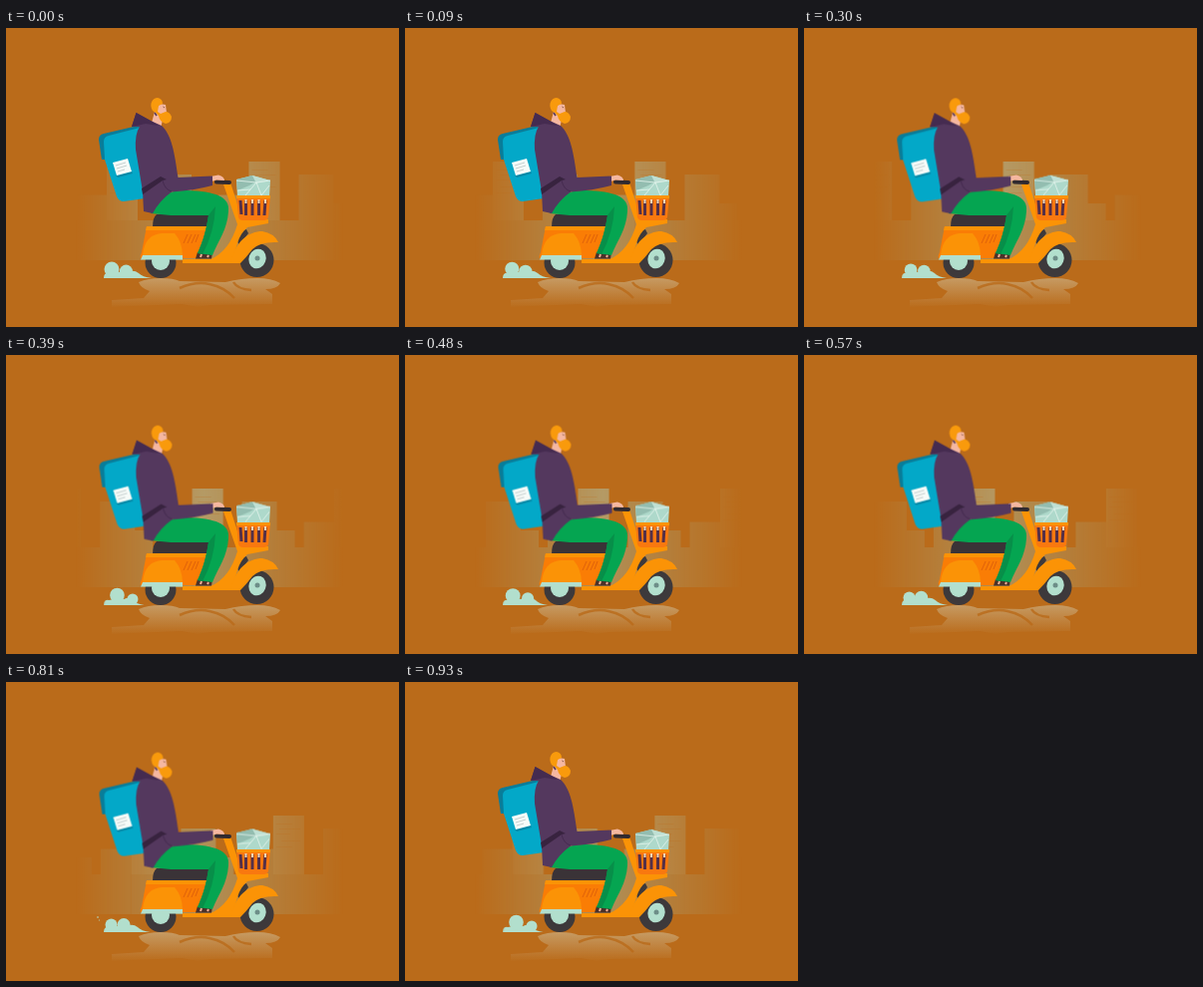
Write an HTML page that moves like this. It is 394 by 300 pixels and loops after 0.96 s.

```html
<!DOCTYPE html>
<html lang="en">
<head>
<meta charset="utf-8">
<title>Scooter courier</title>
<style>
html, body { margin: 0; width: 100%; height: 100%; overflow: hidden; background: #ba6b1a; }
svg { display: block; width: 100vw; height: 100vh; }
.city, .smoke *, .bob, .parcel { animation: .96s linear infinite; }
.city { animation-name: city; animation-timing-function: steps(32); }
.bob { animation-name: bob; }
.parcel { animation-name: parcel; }
.smoke { fill: #b2dfcd; }
.smoke .a { animation-name: puffA; }
.smoke .b { animation-name: puffB; }
.smoke .base { animation-name: base; transform-origin: 99px 251px; }
.smoke .dots { animation-name: dots; animation-timing-function: step-end; }

@keyframes city { to { transform: translateX(-140px); } }
@keyframes bob {
  0%, 18.8%, 71.9%, 96.9%, 100% { transform: none; }
  40.6%, 59.4%, 84.4% { transform: translate(.5px, .6px); }
}
@keyframes parcel {
  0%, 18.8%, 71.9%, 100% { transform: none; }
  40.6%, 59.4%, 84.4% { transform: translateY(-.6px); }
}
@keyframes puffA {
  0%, 56.3% { cx: 106px; cy: 242px; r: 7.5px; }
  3.1%, 59.4% { cx: 105.5px; cy: 243.5px; r: 6px; }
  15.6%, 18.8%, 71.9% { cx: 109px; cy: 240px; r: 8px; }
  28.1%, 84.4% { cx: 105.5px; cy: 243.5px; r: 6px; }
  40.6%, 96.9%, 100% { cx: 111.5px; cy: 241px; r: 7.3px; }
}
@keyframes puffB {
  0%, 56.3% { cx: 120.5px; cy: 244px; r: 6.5px; }
  3.1%, 59.4% { cx: 117.5px; cy: 243.5px; r: 6.7px; }
  15.6%, 18.8%, 71.9% { cx: 124px; cy: 245px; r: 6.5px; }
  28.1%, 84.4% { cx: 118px; cy: 243.5px; r: 6.5px; }
  40.6%, 96.9%, 100% { cx: 127px; cy: 245px; r: 5.5px; }
}
@keyframes base {
  0%, 56.3% { transform: none; }
  3.1%, 59.4% { transform: scaleX(.96); }
  15.6%, 18.8%, 71.9% { transform: scaleX(1.04); }
  28.1%, 84.4% { transform: scaleX(.97); }
  40.6%, 96.9%, 100% { transform: scaleX(.84); }
}
@keyframes dots {
  0%, 31.3%, 87.5%, 100% { opacity: 0; transform: none; }
  12.5%, 68.8% { opacity: 1; transform: none; }
  25%, 81.3% { opacity: .6; transform: translate(-4px, -6px); }
}
</style>
</head>
<body>
<svg viewBox="0 0 394 300" preserveAspectRatio="none">
  <defs>
    <linearGradient id="fade" gradientUnits="userSpaceOnUse" x1="70" x2="338">
      <stop offset="0" stop-color="#fff" stop-opacity="0"/>
      <stop offset=".48" stop-color="#fff"/>
      <stop offset="1" stop-color="#fff" stop-opacity="0"/>
    </linearGradient>
    <mask id="edges" maskUnits="userSpaceOnUse" x="0" y="0" width="394" height="300">
      <rect x="70" y="120" width="268" height="120" fill="url(#fade)"/>
    </mask>
    <linearGradient id="wet" gradientUnits="userSpaceOnUse" x1="0" x2="0" y1="251" y2="281">
      <stop offset="0" stop-color="#cdb48a" stop-opacity=".65"/>
      <stop offset="1" stop-color="#cdb48a" stop-opacity="0"/>
    </linearGradient>
    <g id="block">
      <path fill="#ad9c6c" fill-opacity=".75" d="M0 233V134H31V193H50V147H85V176H103V193H112V167.500H142.500V233Z"/>
      <path fill="#c0b486" fill-opacity=".3" d="M0 134H31V193H0Z"/>
      <path stroke="#ba6b1a" stroke-opacity=".22" d="M3 142.500H19M6 147.500H27M3 152.500H17M8 159.500H27M3 165.500H19"/>
    </g>
  </defs>

  <g mask="url(#edges)">
    <g class="city">
      <use href="#block" x="-41.5"/>
      <use href="#block" x="101"/>
      <use href="#block" x="243.5"/>
      <use href="#block" x="386"/>
    </g>
  </g>

  <!-- reflection -->
  <path fill="url(#wet)" d="M133 255Q142 251 155 251Q168 251 174 254L220 255Q236 251 252 251Q266 251 275 256Q272 262 260 262L267 267V277L205 278L192 280L176 277L106 280V273L138 271L144 264Q135 261 133 255Z"/>
  <path fill="none" stroke="#ba6b1a" stroke-width="2.5" stroke-opacity=".8" d="M174 261Q190 254 204 257Q219 260 229 271M228 255Q232 262 246 263"/>

  <g class="smoke">
    <path class="base" d="M98 251Q98 245 104 246Q112 244 122 245Q128 242 133 246Q137 250 146 251Z"/>
    <circle class="a" cx="106" cy="242" r="7.500"/>
    <circle class="b" cx="120" cy="244" r="6.500"/>
    <g class="dots"><circle cx="96" cy="242" r="1"/><circle cx="97.500" cy="245" r=".7"/></g>
  </g>

  <!-- wheels -->
  <g fill="#3d393b">
    <circle cx="155" cy="235.500" r="15.500"/>
    <circle cx="251.500" cy="233" r="17"/>
  </g>
  <g fill="#b2dfcd">
    <circle cx="155" cy="234" r="9"/>
    <ellipse cx="252" cy="231.500" rx="8.500" ry="10" transform="rotate(20 252 231.500)"/>
  </g>
  <circle cx="252" cy="231" r="2.500" fill="#6d8e88"/>

  <!-- scooter -->
  <path fill="#3a3337" d="M151 187H204L202 200H147Q147 190 151 187Z"/>
  <path fill="#fa7d05" d="M141 199H203L196 231H135Q134 229 136 225Z"/>
  <path fill="#fb9306" d="M141 199H203L202 203H140Z"/>
  <path fill="#fb9306" d="M137 229C138 212 147 206 158 206H169Q177 215 177 229Z"/>
  <path fill="#b2dfcd" d="M137 228H177V232.500H135Z"/>
  <path fill="none" stroke="#e0620a" d="M178 216L182 207M182 216L186 207M186 216L190 207M190 215L193 207"/>
  <path fill="#3d393b" d="M232 214L235 204L241 202L243 206L234 218Z"/>
  <path fill="#fb9306" d="M218 157L225 155L237 192H263V196L242 200Q235 206 232 216Q228 230 226 236H177V232H205Q224 224 232 197Z"/>
  <path fill="#fb9306" d="M225 236C230 214 243 204 257 204Q269 206 273 215Q255 214 247 222Q241 230 235 236Z"/>

  <!-- parcel and basket -->
  <g class="parcel">
    <path fill="#aed9cb" d="M231 152L247 148L265 153L264 169H232Z"/>
    <path fill="#93bdb0" d="M231 152L247 148L251 154L244 158L232 163Z"/>
    <path fill="#bfe0d4" d="M247 148L265 153L251 156Z"/>
    <path fill="none" stroke="#e6f5ee" stroke-width=".8" d="M231 153L251 155L265 153M251 155L240 168M251 155L256 168L264 158M232 163L245 162"/>
  </g>
  <path fill="#f9780f" d="M231 168H265L263 190Q262 193 258 193H238Q234 193 233 190Z"/>
  <path fill="#fb9306" d="M231 168H265V171H231Z"/>
  <path stroke="#553047" stroke-width="3" d="M235 173L236 187M240.500 173V188M247 173V188M253.500 173V188M260 173L259 188"/>
  <path stroke="#f6d9b5" stroke-width="2" d="M240.500 172V176M247 172V176M253.500 172V176M260 172V176"/>

  <!-- legs -->
  <path fill="#4b3129" d="M190 231.500L192 225H207L206 231.500Z"/>
  <path fill="#05a551" d="M145 186C152 168 162 163 182 163C209 164 225 169 223 184C222 202 213 213 207 228L192 226C198 213 201 202 203 188H165Z"/>
  <path fill="#078f49" d="M203 188L210 179Q209 205 197 227L192 226C198 213 201 201 203 188Z"/>
  <path stroke="#f3b298" stroke-width="2" d="M196 227L195 230M203 228L202 230"/>

  <!-- handlebar -->
  <path stroke="#302a30" stroke-width="4" stroke-linecap="round" d="M211 154.500L224 155"/>
  <path fill="#f5b7a0" d="M205 149L213 147.500Q219 149 219 153L211 152.500L206 154Z"/>

  <g class="bob">
    <!-- head -->
    <path fill="#f5b7a0" d="M149 84L146 95L155 101L157 92L161 85L160 77L154 76Z"/>
    <path fill="#f99a0c" d="M147 83C143 76 147 70 152 70Q157 71 157 76L153 78L152 84L155 86L160 84Q164 84 166 89Q166 95 160 96Q154 94 153 88L150 85Z"/>
    <path stroke="#54385e" stroke-width="1.500" d="M149 85L151 88"/>
    <path stroke="#6a3b2a" stroke-width=".8" d="M157.500 79L159 80"/>

    <!-- backpack -->
    <path fill="#087d9a" d="M93 112Q93 107 98 106L128 99L134 99L130 110L101 132L96 132Z"/>
    <path fill="#03a8c8" d="M98 114Q98 109 103 108L134 100L132 118L139 171L118 174Q113 174 111 169L99 132Z"/>
    <path fill="#0789a7" d="M110 148L126 144L127 146L112 150Z"/>
    <path fill="#f7fbf8" d="M107 135L122 131L126 144L111 148Z"/>
    <path stroke="#b8c5c5" stroke-width=".8" d="M110 138L120 135M111 141L121 138M112 144L119 142"/>

    <!-- jacket -->
    <path fill="#54385e" d="M126 99L130.500 85L145 93L156 98C166 107 169 125 172.500 150L207 148.500V158Q188 163 166 164.500Q154 173 147 186L138 184L137 164L130 122Q129 106 134 99Z"/>
    <path fill="#452b50" d="M126 99L130.500 85L145 93L153 98L140 96Z"/>
    <path fill="#38233f" d="M136 161L155 149L161 152L157 153L137 167Z"/>
    <path fill="none" stroke="#452b50" d="M157 153Q159 162 166 164"/>
  </g>
</svg>
</body>
</html>
```
